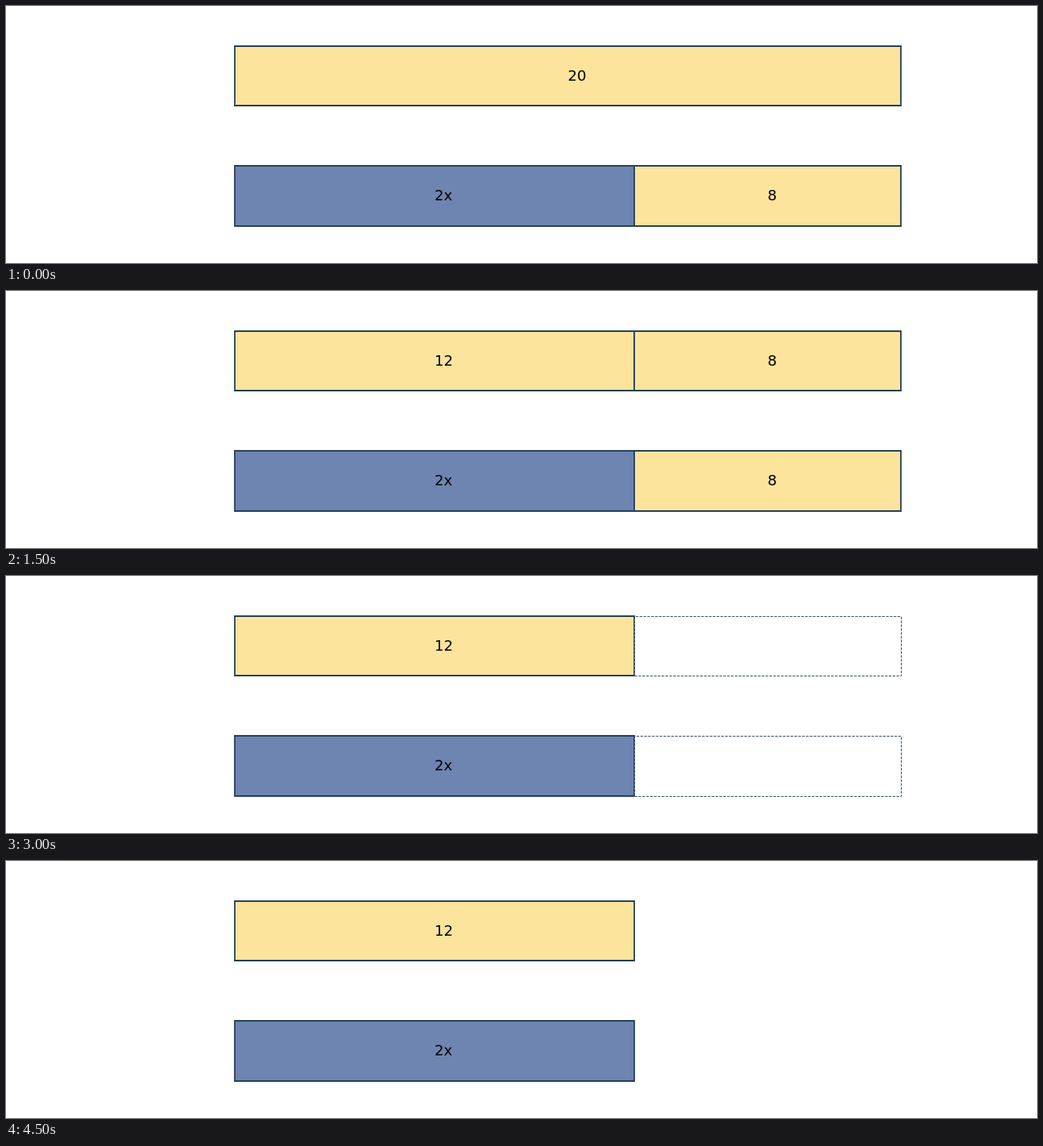
Animation, 1280 px wide and 320 px high, one loop 6 s. Source, as an HTML page:

```html
<!DOCTYPE html>
<html lang="en">
<head>
<meta charset="utf-8">
<title>Bar model: 2x + 8 = 20</title>
<style>
html, body { margin: 0; width: 100%; height: 100%; overflow: hidden; background: #fff; }
svg { display: block; width: 1280px; height: 320px; }
text { font: 18.06px "DejaVu Sans", sans-serif; fill: #000; }
path { stroke: #264159; stroke-width: 1.8; }
.gone { fill: #fff; stroke-width: 0.9; stroke-dasharray: 3.34 1.44; }
</style>
</head>
<body>
<svg id="stage" viewBox="0 0 1280 320"></svg>
<script>
const YELLOW = "#fce49c", BLUE = "#6e85b1";
const STEP = 1500;
const LEFT = 284, SPLIT = 780, RIGHT = 1111;
const ROWS = [
  { top: 50, bottom: 124, base: 93 },
  { top: 199, bottom: 274, base: 242 }
];

const outline = (x0, x1, row, d = 0) =>
  `M${x0 + d} ${row.bottom + d}H${x1 + d}V${row.top + d}H${x0 + d}Z`;

// Labels start at the middle of their bar.
const bar = (x0, x1, row, fill, label) =>
  `<path d="${outline(x0, x1, row)}" fill="${fill}"/>` +
  `<text x="${((x0 + x1) / 2).toFixed(1)}" y="${row.base}">${label}</text>`;

const removed = row => `<path class="gone" d="${outline(SPLIT, RIGHT, row, 0.5)}"/>`;

const [upper, lower] = ROWS;
const twenty = bar(LEFT, RIGHT, upper, YELLOW, "20");
const twelve = bar(LEFT, SPLIT, upper, YELLOW, "12");
const twoX = bar(LEFT, SPLIT, lower, BLUE, "2x");
const eight = row => bar(SPLIT, RIGHT, row, YELLOW, "8");

const steps = [
  twenty + twoX + eight(lower),
  twelve + eight(upper) + twoX + eight(lower),
  twelve + twoX + ROWS.map(removed).join(""),
  twelve + twoX
];

const stage = document.getElementById("stage");
const start = performance.now();
let shown = -1;

function draw(now) {
  const step = Math.floor(Math.max(0, now - start) / STEP) % steps.length;
  if (step !== shown) {
    stage.innerHTML = steps[step];
    shown = step;
  }
  requestAnimationFrame(draw);
}
draw(start);
</script>
</body>
</html>
```
